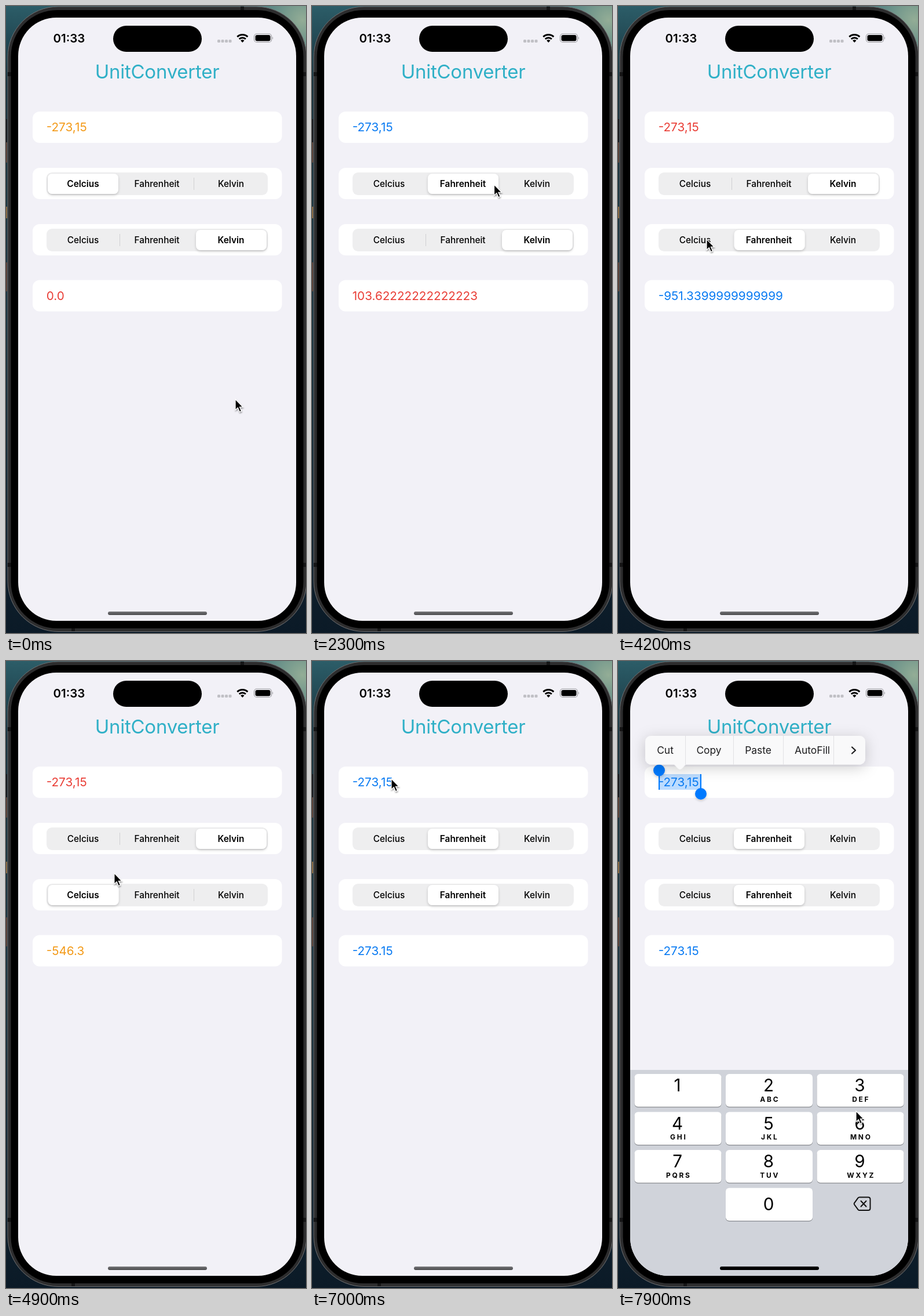
An HTML page for the animation above (8 s loop, 518 px wide and 1081 px high).

```html
<!DOCTYPE html>
<html lang="en">
<head>
<meta charset="utf-8">
<title>UnitConverter</title>
<style>
  html, body { margin: 0; width: 100%; height: 100%; overflow: hidden; background: #0b1720; }
  svg { display: block; font-family: Inter, Roboto, sans-serif; }
  .mid { text-anchor: middle; }
  .seg { font-size: 15.4px; font-weight: 500; text-anchor: middle; }
  .value { font-size: 20.7px; }
  .digit { font-size: 29.6px; text-anchor: middle; }
  .letters { font-size: 12px; font-weight: 700; letter-spacing: 2.7px; text-anchor: middle; }
  .item { font-size: 17.4px; text-anchor: middle; fill: #1c1c1e; }
</style>
</head>
<body>
<svg width="518" height="1081" viewBox="0 0 518 1081">
  <defs>
    <linearGradient id="wall" x2="0" y2="1">
      <stop offset="0" stop-color="#2c5d68"/>
      <stop offset=".12" stop-color="#17313c"/>
      <stop offset=".5" stop-color="#1b3540"/>
      <stop offset="1" stop-color="#0b1a27"/>
    </linearGradient>
    <radialGradient id="glow" gradientUnits="userSpaceOnUse" cx="512" cy="24" r="95">
      <stop offset="0" stop-color="#93ad96"/>
      <stop offset="1" stop-color="#3c727b"/>
    </radialGradient>
    <linearGradient id="bar" x2="0" y2="1">
      <stop offset="0" stop-color="#77777a"/>
      <stop offset="1" stop-color="#49494b"/>
    </linearGradient>
    <clipPath id="screen"><rect x="21" y="20" width="480" height="1040" rx="66"/></clipPath>
    <filter id="soft" x="-30%" y="-80%" width="160%" height="300%">
      <feDropShadow dx="0" dy="5" stdDeviation="12" flood-opacity=".2"/>
    </filter>
    <filter id="lift" x="-20%" y="-30%" width="140%" height="180%">
      <feDropShadow dx="0" dy="2" stdDeviation="2" flood-opacity=".2"/>
    </filter>
    <filter id="drop" x="-50%" y="-30%" width="220%" height="180%">
      <feDropShadow dx="0.5" dy="2" stdDeviation="1.3" flood-opacity=".4"/>
    </filter>
  </defs>

  <!-- wallpaper and phone body -->
  <rect width="518" height="1081" fill="url(#wall)"/>
  <rect x="410" width="108" height="100" fill="url(#glow)"/>
  <path d="M0 195h2v40h-2z" fill="#15161a"/>
  <path d="M0 235h2v35h-2zM0 442h2v50h-2z" fill="#5b4238"/>
  <path d="M0 346h2v20h-2z" fill="#8a6a43"/>
  <rect x="3" y="1" width="516" height="1077.5" rx="87" fill="#2d2d2e" stroke="#707173"/>
  <path d="M3 114h6v7h-6zM3 960h6v7h-6zM513 114h5v7h-5zM513 960h5v7h-5zM405 1h6v6h-6zM113 1072h6v6h-6z" fill="#151516"/>
  <rect x="8.5" y="7" width="505" height="1066" rx="80" fill="#000"/>
  <rect x="21" y="20" width="480" height="1040" rx="66" fill="#f2f1f7"/>

  <!-- status bar -->
  <text class="mid" x="109" y="63" font-size="20.5" font-weight="600">01:33</text>
  <rect x="185" y="34" width="153" height="45" rx="22.5"/>
  <g fill="#c0c0c5">
    <rect x="365" y="58" width="5" height="5" rx="1.5"/><rect x="371.5" y="58" width="5" height="5" rx="1.5"/>
    <rect x="378" y="58" width="5" height="5" rx="1.5"/><rect x="384.5" y="58" width="5" height="5" rx="1.5"/>
  </g>
  <g fill="none" stroke="#000" stroke-width="3">
    <path d="M399.3 53.2a13 13 0 0 1 18 0"/>
    <path d="M402.7 57a8.2 8.2 0 0 1 11.2 0"/>
  </g>
  <path d="M408.3 63l-3.2-3.4a4.8 4.8 0 0 1 6.4 0z"/>
  <rect x="428.5" y="48" width="30" height="14.5" rx="4.5" fill="none" stroke="#9b9b9f" stroke-width="1.2"/>
  <rect x="430.5" y="50" width="26" height="10.5" rx="3"/>
  <path d="M460 53q2 2.2 0 4.6z" fill="#9b9b9f"/>

  <text class="mid" x="261" y="125" font-size="33" letter-spacing="-.25" fill="#30b0c7">UnitConverter</text>

  <!-- cards -->
  <g fill="#fff">
    <rect x="46" y="182" width="430.5" height="54" rx="12"/>
    <rect x="46" y="279" width="430.5" height="54" rx="12"/>
    <rect x="46" y="376" width="430.5" height="54" rx="12"/>
    <rect x="46" y="472.5" width="430.5" height="54" rx="12"/>
  </g>
  <g id="from" transform="translate(0 279)"></g>
  <g id="to" transform="translate(0 376)"></g>
  <rect id="mark" y="195" height="27" fill="#bcdcff"/>
  <text id="input" class="value" x="69.7" y="216">-273,15</text>
  <text id="result" class="value" x="69.7" y="507"></text>

  <g clip-path="url(#screen)"><g id="keys"></g></g>
  <rect id="home" x="176" y="1044" width="171" height="6" rx="3"/>

  <g id="handles" fill="#007aff">
    <g id="left"><path d="M-1 190h2.2v32h-2.2z"/><circle cy="188.5" r="10" filter="url(#lift)"/></g>
    <g id="right"><path d="M-1.2 195h2.2v30h-2.2z"/><circle id="knobEnd" cy="229" r="10" filter="url(#lift)"/></g>
  </g>
  <g id="menu">
    <g filter="url(#soft)" fill="#f9f9fa">
      <rect x="47" y="129" width="380" height="49.5" rx="10"/>
      <path id="tail" d="M-12 178h24c-4 0-8 8.5-12 8.5s-8-8.5-12-8.5z"/>
    </g>
    <path d="M116.5 129v49.5M199.5 129v49.5M285.5 129v49.5M372.5 129v49.5" stroke="#e1e1e4"/>
    <text class="item" x="81.5" y="160">Cut</text>
    <text class="item" x="157" y="160">Copy</text>
    <text class="item" x="242" y="160">Paste</text>
    <text class="item" x="335.5" y="160">AutoFill</text>
    <path d="M404 148.5l6 5.5-6 5.5" fill="none" stroke="#1c1c1e" stroke-width="2.2" stroke-linecap="round" stroke-linejoin="round"/>
  </g>
  <path id="cursor" d="M0 0V18.5L4.3 14.6 7.4 21.8 10.5 20.4 7.4 13.4H13z" stroke="#fff" stroke-width="1.2" filter="url(#drop)"/>
</svg>
<script>
const LOOP = 8000, STEP = 100;
const UNITS = ['Celcius', 'Fahrenheit', 'Kelvin'];
const COLORS = ['#f39a18', '#087af2', '#e93d35'];
const CENTERS = [133, 260.5, 388.5];

// [time, unit]
const FROM = [[0, 0], [1690, 1], [2910, 2], [5510, 1]];
const TO = [[0, 2], [3890, 1], [4590, 0], [6090, 1]];
const RESULTS = [[0, '0.0'], [1690, '103.62222222222223'], [2910, '-273.15'], [3890, '-951.3399999999999'],
  [4590, '-546.3'], [5510, '-169.52777777777777'], [6090, '-273.15']];
// [time, x, y]
const PATH = [[0, 396, 678], [120, 396, 678], [1300, 253, 307], [1900, 253, 307], [2700, 376, 309],
  [2870, 376, 309], [3100, 301, 362], [3300, 262, 392], [3500, 262, 392], [3700, 265, 394],
  [3850, 265, 394], [4200, 153, 402], [4400, 143, 401], [4550, 143, 401], [5400, 262, 306],
  [5500, 262, 306], [5700, 266, 368], [5900, 265, 398], [6050, 265, 398], [6700, 137, 203],
  [7600, 137, 203], [7800, 271, 381], [7900, 411, 776], [8000, 411, 776]];

const $ = id => document.getElementById(id);
const clamp = v => Math.max(0, Math.min(1, v));
const set = (el, attrs) => { for (const k in attrs) el.setAttribute(k, attrs[k]); };
const show = (el, on) => { el.style.display = on ? '' : 'none'; };
const lastIndex = (list, t) => list.findLastIndex(e => e[0] <= t);
const current = (list, t) => list[lastIndex(list, t)][1];
// share of the way still to go in a critically damped spring
const remaining = (ms, rate) => {
  const x = Math.max(0, ms) / 1000 * rate;
  return (1 + x) * Math.exp(-x);
};

function buildPicker(g) {
  g.innerHTML = `<rect x="70" y="8" width="382" height="39" rx="9.5" fill="#eeeeef"/>
    <path class="d0" d="M196.5 17v21" stroke="#cfcfd2"/>
    <path class="d1" d="M324.5 17v21" stroke="#cfcfd2"/>
    <rect class="knob" x="72" y="10" width="122" height="35" rx="8" fill="#fff" filter="url(#lift)"/>` +
    UNITS.map((u, i) => `<text class="seg" x="${CENTERS[i]}" y="33">${u}</text>`).join('');
}

function drawPicker(g, events, t) {
  const i = lastIndex(events, t);
  const [start, unit] = events[i];
  const before = i ? events[i - 1][1] : unit;
  const pos = unit + (before - unit) * remaining(t - start, 24);
  set(g.querySelector('.knob'), { x: 72 + 128 * pos });
  set(g.querySelector('.d0'), { opacity: clamp(pos - 1) });
  set(g.querySelector('.d1'), { opacity: clamp(1 - pos) });
  g.querySelectorAll('text').forEach((el, k) => { el.style.fontWeight = k === unit ? 600 : 500; });
}

function buildKeys() {
  const letters = ['', 'ABC', 'DEF', 'GHI', 'JKL', 'MNO', 'PQRS', 'TUV', 'WXYZ'];
  const key = (col, row, digit, sub, base) => {
    const x = 28.5 + 157.5 * col, y = 712 + 65.5 * row, cx = x + 75;
    return `<rect x="${x}" y="${y + 1.3}" width="150" height="56.5" rx="6" fill="#898b90"/>
      <rect x="${x}" y="${y}" width="150" height="56.5" rx="6" fill="#fff"/>
      <text class="digit" x="${cx - 1}" y="${y + base}">${digit}</text>
      <text class="letters" x="${cx + 1.3}" y="${y + 47.7}">${sub}</text>`;
  };
  $('keys').innerHTML = '<rect x="21" y="705" width="480" height="420" fill="#d0d3da"/>' +
    letters.map((s, i) => key(i % 3, Math.floor(i / 3), i + 1, s, 30.3)).join('') +
    key(1, 3, 0, '', 38.5) +
    `<g fill="none" stroke="#111" stroke-width="2" stroke-linecap="round" stroke-linejoin="round">
      <path d="M417 924.5h15q3.5 0 3.5 3.5v15.500q0 3.500-3.500 3.500h-15q-1.500 0-2.500-1.200l-6.500-8.800q-.7-1.200 0-2.400l6.500-8.900q1-1.200 2.500-1.200z"/>
      <path d="M419.500 931l9 9.500M428.500 931l-9 9.500"/>
    </g>`;
}

function pointer(t) {
  const i = Math.min(lastIndex(PATH, t), PATH.length - 2);
  const a = PATH[i], b = PATH[i + 1], span = b[0] - a[0], u = (t - a[0]) / span;
  const rests = (p, q) => !p || !q || (p[1] === q[1] && p[2] === q[2]);
  const slope = (k, c) => {
    const p = PATH[k - 1], q = PATH[k + 1];
    return rests(p, PATH[k]) || rests(PATH[k], q) ? 0 : (q[c] - p[c]) / (q[0] - p[0]);
  };
  return [1, 2].map(c => {
    const d = b[c] - a[c], m = slope(i, c) * span, n = slope(i + 1, c) * span;
    return a[c] + m * u + (3 * d - 2 * m - n) * u * u + (m + n - 2 * d) * u * u * u;
  });
}

function drawEditing(t) {
  const editing = t >= 7100, selected = t >= 7200;
  show($('keys'), editing);
  set($('keys'), { transform: `translate(0 ${355 * remaining(t - 7095, 18.26)})` });
  set($('home'), { fill: editing ? '#000' : 'url(#bar)' });

  const start = t < 7500 ? 80.5 : 71, end = 143;
  show($('handles'), editing);
  show($('left'), selected);
  show($('knobEnd'), selected);
  show($('mark'), selected);
  set($('left'), { transform: `translate(${start} 0)` });
  set($('right'), { transform: `translate(${end} 0)` });
  set($('mark'), { x: start, width: end - start });

  const grow = clamp((t - 7200) / 200), s = 0.714 + 0.286 * grow;
  show($('menu'), selected);
  set($('menu'), {
    opacity: clamp(grow * 2),
    transform: `translate(115 190) scale(${s}) translate(-115 -190)`
  });
  set($('tail'), { transform: `translate(${(start + end) / 2} 0)` });
}

function draw(t) {
  drawPicker($('from'), FROM, t);
  drawPicker($('to'), TO, t);
  set($('input'), { fill: COLORS[current(FROM, t)] });
  set($('result'), { fill: COLORS[current(TO, t)] });
  $('result').textContent = current(RESULTS, t);
  drawEditing(t);
  set($('cursor'), { transform: `translate(${pointer(t).join(' ')})` });
}

buildPicker($('from'));
buildPicker($('to'));
buildKeys();
const origin = performance.now();
function tick() {
  const t = (performance.now() - origin) % LOOP;
  draw(Math.floor(t / STEP) * STEP);
  requestAnimationFrame(tick);
}
tick();
</script>
</body>
</html>
```
